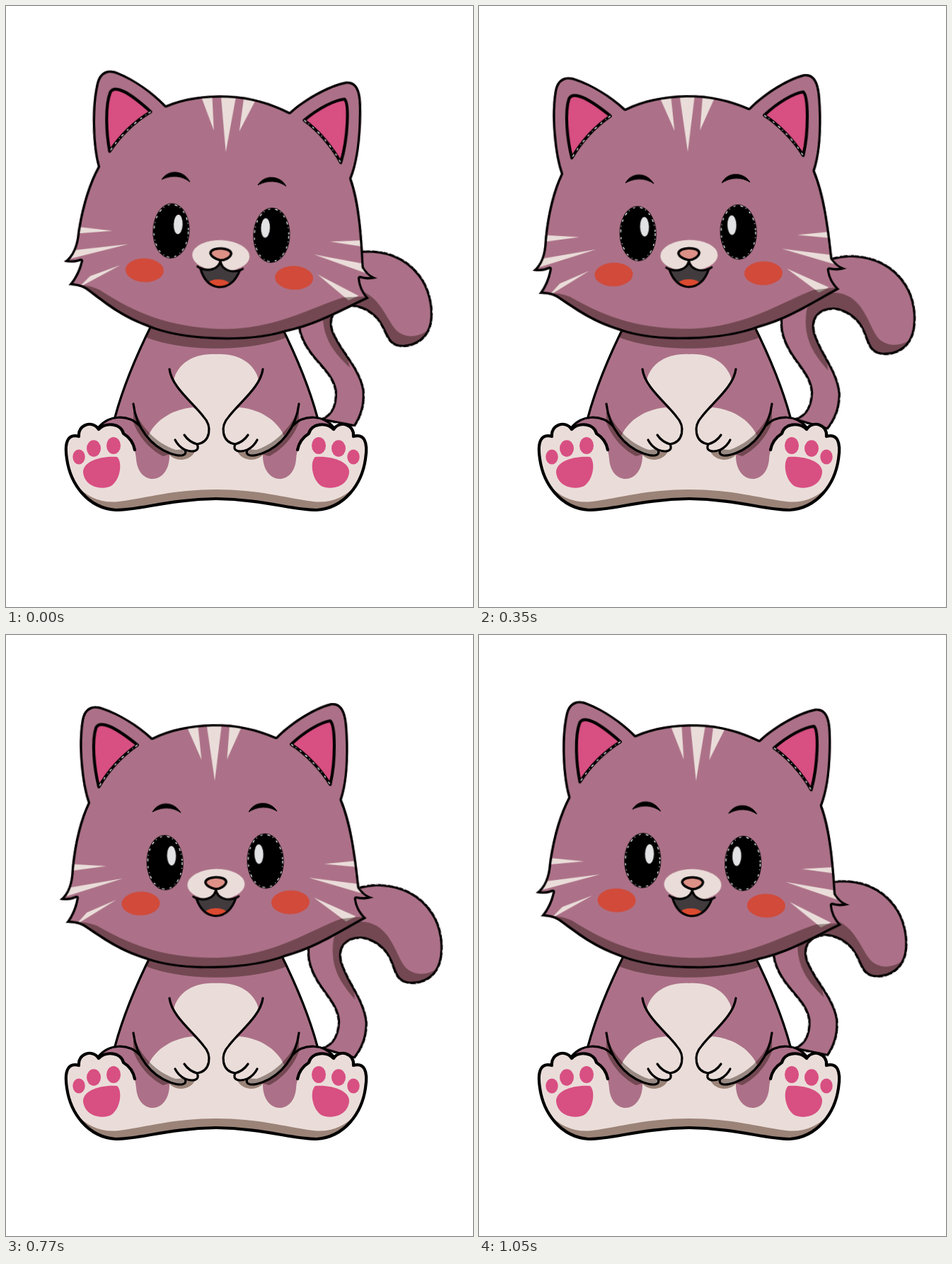
An HTML page without scripts that plays this animation: 660x849 px, repeating every 1120 ms.

```html
<!DOCTYPE html>
<html lang="en">
<head>
<meta charset="utf-8">
<title>Sitting kitten</title>
<style>
html, body { margin: 0; width: 100%; height: 100%; overflow: hidden; background: #fff; }
svg { display: block; width: 100vw; height: 100vh; }
.fur { fill: #ac7188; }
.cream { fill: #eaddd9; }
.pink { fill: #d84f82; }
.blush { fill: #d14a3a; }
.tan { fill: #9b8378; }
.shade { fill: rgb(30, 10, 0); fill-opacity: .4; }
.line { fill: none; stroke: #000; stroke-width: 3.2; stroke-linecap: round; stroke-linejoin: round; }
.bold { stroke-width: 4.2; }
.rim { stroke-width: 6.6; } /* clipped to its inner half */
.fleck { fill: none; stroke: #fff; stroke-width: 1.2; stroke-dasharray: 4 4 1 6 3 7; }

#head, #tail { animation: nod 1120ms steps(1) infinite; }
#head { transform-origin: 295px 468px; }
#tail { transform-origin: 447px 592px; animation-name: wag; }

@keyframes nod {
  0%, 100% { transform: rotate(2.1deg); }
  6.25%, 93.75% { transform: rotate(1.25deg); }
  18.75%, 81.25% { transform: rotate(0deg); }
  31.25%, 68.75% { transform: rotate(-1.3deg); }
  43.75%, 56.25% { transform: rotate(-2.1deg); }
  50% { transform: rotate(-2.3deg); }
  6.25%, 18.75%, 31.25%, 56.25%, 68.75%, 81.25% { animation-timing-function: steps(2); }
}
@keyframes wag {
  0%, 100% { transform: rotate(-2.9deg); }
  6.25%, 93.75% { transform: rotate(-2deg); }
  18.75%, 81.25% { transform: rotate(0deg); }
  31.25%, 68.75% { transform: rotate(2.4deg); }
  43.75%, 56.25% { transform: rotate(4.4deg); }
  50% { transform: rotate(5deg); }
  6.25%, 18.75%, 31.25%, 56.25%, 68.75%, 81.25% { animation-timing-function: steps(2); }
}
</style>
</head>
<body>
<svg viewBox="0 0 660 849" preserveAspectRatio="none">
<defs>
  <path id="tailShape" d="M512 349C550 347 578 362 595 386C609 405 614 434 609 456C604 476 588 488 567 488C539 486 546 462 528 443C515 430 501 427 494 427C474 428 465 441 469 458C477 486 505 512 509 545C510 568 503 584 493 597L440 584C460 580 467 566 467 545C464 515 431 500 421 460C412 410 450 355 512 349Z"/>
  <clipPath id="tailClip"><use href="#tailShape"/></clipPath>

  <path id="headShape" d="M121 233C112 205 108 150 115 115C119 97 132 94 145 99C170 108 195 125 214 143C240 131 270 126 301 126C335 126 365 135 389 146C405 130 440 106 468 100C483 99 489 112 490 135C492 180 488 215 480 237C493 270 498 315 502 361C508 370 514 374 522 376C513 379 505 379 497 377C498 388 503 397 511 405C475 423 440 446 395 457C345 475 250 476 200 457C155 442 130 420 110 407C103 403 95 402 86 402C95 391 100 378 102 367C95 370 88 371 78 369C90 360 95 346 96 325C101 285 110 255 121 233Z"/>
  <clipPath id="headClip"><use href="#headShape"/></clipPath>

  <path id="mouthShape" d="M271 371C282 376 297 372 299 360C301 372 315 377 327 372C322 387 312 397 298 397C285 396 276 387 271 371Z"/>
  <clipPath id="mouthClip"><use href="#mouthShape"/></clipPath>

  <path id="footShape" d="M298 697C230 697 190 713 155 713C115 710 90 675 85 640C82 615 88 604 103 608C101 592 122 584 131 598C142 587 165 590 165 605L200 600H298Z"/>
  <clipPath id="footClip"><use href="#footShape"/></clipPath>

  <path id="armShape" d="M231 513C234 538 264 560 279 580C292 594 289 616 270 619C275 629 264 631 253 627C257 636 246 637 232 632C205 622 184 596 180 562Z"/>
  <clipPath id="armClip"><use href="#armShape"/></clipPath>

  <g id="torso">
    <path class="fur" d="M298 445H208C180 500 165 540 153 582L165 625H298Z"/>
    <path class="line" d="M206 450C181 500 165 540 154 581"/>
    <path class="cream" d="M298 492C262 490 239 508 236 534L280 625H298Z"/>
  </g>

  <g id="limbs">
    <use href="#footShape" class="cream"/>
    <path class="fur" d="M131 595C145 578 175 576 200 600L231 632C233 677 187 680 184 640C183 624 176 612 165 605C160 590 142 588 131 598Z"/>
    <path class="shade" d="M180 565C184 596 205 622 232 633L222 636C202 626 186 606 180 588Z"/>
    <path class="tan" clip-path="url(#footClip)" d="M298 683C235 683 200 695 160 700C135 703 115 694 98 676L100 720H298Z"/>
    <path class="tan" d="M230 633C240 645 261 643 267 629Z"/>
    <path class="line bold" d="M298 696C230 697 190 712 155 712C115 709 91 675 86 640C82 615 88 604 103 608C101 592 122 584 131 598C142 587 163 590 166 604C174 609 180 616 182 627"/>
    <path class="line" d="M131 595C145 578 172 576 189 593"/>

    <g class="pink">
      <ellipse cx="103" cy="637" rx="8.7" ry="10.5"/>
      <ellipse cx="124" cy="625" rx="10" ry="11.7"/>
      <ellipse cx="152" cy="621" rx="10" ry="12"/>
      <path d="M109 659C108 644 133 635 157 637C164 643 163 666 150 677C143 682 130 682 121 677C114 673 110 667 109 659Z"/>
    </g>

    <use href="#armShape" class="fur"/>
    <g clip-path="url(#armClip)">
      <path class="cream" d="M200 610C208 588 232 570 264 567L300 590V645H215Z"/>
      <path class="shade" d="M176 555C184 585 205 615 240 627L254 626V645H215L170 600Z"/>
    </g>
    <path class="line" d="M231 513C234 538 264 560 279 580C292 594 289 616 270 619C275 629 264 631 253 627C257 636 246 637 232 632C205 622 184 596 180 562M270 619C263 617 256 612 252 606M253 627C247 624 242 619 239 613"/>
  </g>
</defs>

<g id="tail">
  <use href="#tailShape" class="fur"/>
  <g clip-path="url(#tailClip)">
    <path class="shade" d="M456 430C452 470 470 492 490 513L480 460L500 432L530 445L545 490H590L608 462C590 477 568 476 557 462C543 443 535 407 500 403C475 402 460 412 456 430Z"/>
    <use href="#tailShape" class="line rim"/>
    <use href="#tailShape" class="fleck"/>
  </g>
</g>

<use href="#torso"/>
<use href="#torso" transform="translate(594) scale(-1 1)"/>
<path class="shade" d="M198 468C250 489 345 489 397 468L388 445H208Z"/>
<use href="#limbs"/>
<use href="#limbs" transform="translate(594) scale(-1 1)"/>

<g id="head">
  <use href="#headShape" class="fur"/>
  <g clip-path="url(#headClip)">
    <path class="cream" d="M263 128H279L283 176ZM291 124H313L301 206ZM324 126L341 130L319 176Z"/>
    <path class="cream" d="M94 319L145 323L92 329ZM94 352L168 341L82 366ZM116 388L158 371L100 405Z"/>
    <path class="cream" d="M505 323L453 327L505 333ZM505 357L431 346L522 375ZM496 402L437 374L482 409Z"/>
    <path class="shade" d="M86 400C105 400 118 402 130 407C185 440 230 455 300 456C380 455 430 420 475 405L512 402V480H85Z"/>
    <use href="#headShape" class="line rim"/>
  </g>

  <g class="line bold">
    <path class="pink" d="M137 211C131 185 128 146 135 127C141 117 160 125 193 153C170 168 150 190 137 211Z"/>
    <path class="pink" d="M464 215C451 193 430 170 410 157C430 139 452 127 466 125C473 131 473 180 464 215Z"/>
  </g>
  <path class="fleck" d="M193 153C170 168 150 190 137 211M410 157C430 170 451 193 464 215"/>

  <path stroke="#000" stroke-linejoin="round" d="M212 248C221 233 242 233 252 250C240 241 225 241 212 248ZM348 251C357 235 379 236 388 251C376 243 361 243 348 251Z"/>

  <ellipse cx="228" cy="320" rx="26" ry="39"/>
  <ellipse cx="370" cy="321" rx="26" ry="39"/>
  <ellipse class="fleck" cx="228" cy="320" rx="24.3" ry="37.3"/>
  <ellipse class="fleck" cx="370" cy="321" rx="24.3" ry="37.3"/>
  <g fill="#e2e2e4">
    <ellipse cx="237.5" cy="310.5" rx="6.3" ry="13.8"/>
    <ellipse cx="361" cy="311" rx="6.3" ry="13.8"/>
  </g>

  <ellipse class="blush" cx="192.5" cy="377" rx="27" ry="16.7"/>
  <ellipse class="blush" cx="404" cy="380" rx="27" ry="16.7"/>

  <ellipse class="cream" cx="299.5" cy="352.5" rx="40.5" ry="22"/>
  <use href="#mouthShape" fill="#413b3d"/>
  <ellipse clip-path="url(#mouthClip)" cx="298" cy="394" rx="16" ry="8" fill="#dc4a30"/>
  <use href="#mouthShape" class="line"/>
  <path class="line" d="M267 369L272 372M326 373L331 370"/>
  <path fill="#dd9187" stroke="#000" stroke-width="3.4" d="M284.5 349C286 340 313 340 314 349C313 355 305 359 299 359C293 358 285 354 284.5 349Z"/>
</g>
</svg>
</body>
</html>
```
